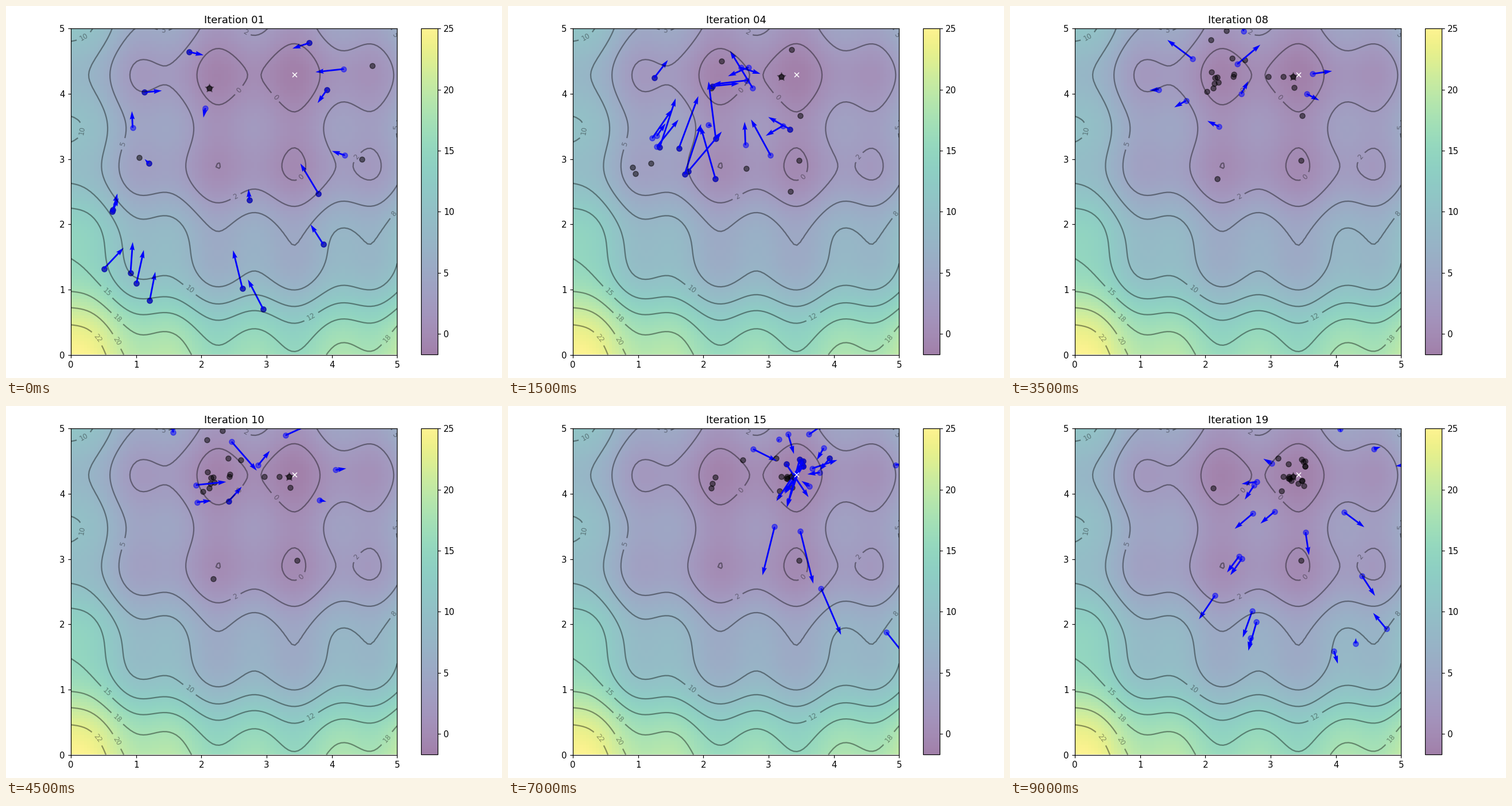
Write a matplotlib script that moves like this. It is 864 px wide and 648 px high and loops after 9500 ms.

```python
import numpy as np
import matplotlib.pyplot as plt
from matplotlib.animation import FuncAnimation

WIDTH, HEIGHT = 864, 648
STEPS = 19
PARTICLES = 20
C1 = C2 = 0.1  # pull towards personal and global best
W = 1.0        # inertia


def f(x, y):
    return (x - 3)**2 + (y - 4)**2 + np.sin(5 * x) + np.sin(4 * y)


def swarm(steps):
    """Return (position, velocity, personal best, global best) per step."""
    np.random.seed(100)
    pos = np.random.rand(2, PARTICLES) * 5
    vel = np.random.randn(2, PARTICLES) * 0.1
    best, best_obj = pos.copy(), f(*pos)
    top = best[:, best_obj.argmin()].copy()
    states = []
    for _ in range(steps):
        r1, r2 = np.random.rand(2)
        vel = W * vel + C1 * r1 * (best - pos) + C2 * r2 * (top[:, None] - pos)
        pos = pos + vel
        obj = f(*pos)
        best = np.where(obj <= best_obj, pos, best)
        best_obj = np.minimum(obj, best_obj)
        top = best[:, best_obj.argmin()].copy()
        states.append((pos, vel, best, top))
    return states


def place(axes, left, bottom, width, height):
    """Put axes at a box given in pixels."""
    axes.set_position([left / WIDTH, bottom / HEIGHT, width / WIDTH, height / HEIGHT])


# The first step happens before the picture starts.
states = swarm(STEPS + 1)[1:]

x, y = np.meshgrid(np.linspace(0, 5, 100), np.linspace(0, 5, 100))
z = f(x, y)
low = z.argmin()

fig, ax = plt.subplots(figsize=(8, 6), dpi=100)
img = ax.imshow(z, extent=[0, 5, 0, 5], origin="lower", cmap="viridis", alpha=0.5)
bar = fig.colorbar(img, ax=ax)
ax.plot(x.flat[low], y.flat[low], marker="x", markersize=5, color="white")
contours = ax.contour(x, y, z, 10, colors="black", alpha=0.4)
ax.clabel(contours, inline=True, fontsize=8, fmt="%.0f")

# Contour labels are chosen at 100 dpi; the stage itself is 108 dpi.
fig.set_dpi(WIDTH / 8)
place(ax, 113, 40.5, 568.3, 568.3)
place(bar.ax, 723.2, 40.5, 28.4, 568.3)

pos, vel, best, top = states[0]
best_dots = ax.scatter(*best, marker="o", color="black", alpha=0.5)
dots = ax.scatter(*pos, marker="o", color="blue", alpha=0.5)
arrows = ax.quiver(*pos, *vel, color="blue", width=0.005,
                   angles="xy", scale_units="xy", scale=1)
star = ax.scatter(*top, marker="*", s=100, color="black", alpha=0.4)
ax.set_xlim(0, 5)
ax.set_ylim(0, 5)


def draw(i):
    pos, vel, best, top = states[i]
    ax.set_title(f"Iteration {i + 1:02d}")
    best_dots.set_offsets(best.T)
    dots.set_offsets(pos.T)
    arrows.set_offsets(pos.T)
    # Arrow angles are taken from the base points, so move these too.
    arrows.XY = pos.T
    arrows.X, arrows.Y = pos
    arrows.set_UVC(*vel)
    star.set_offsets([top])
    return best_dots, dots, arrows, star


anim = FuncAnimation(fig, draw, frames=STEPS, interval=500,
                     blit=False, repeat=True, repeat_delay=0)
plt.show()
```
